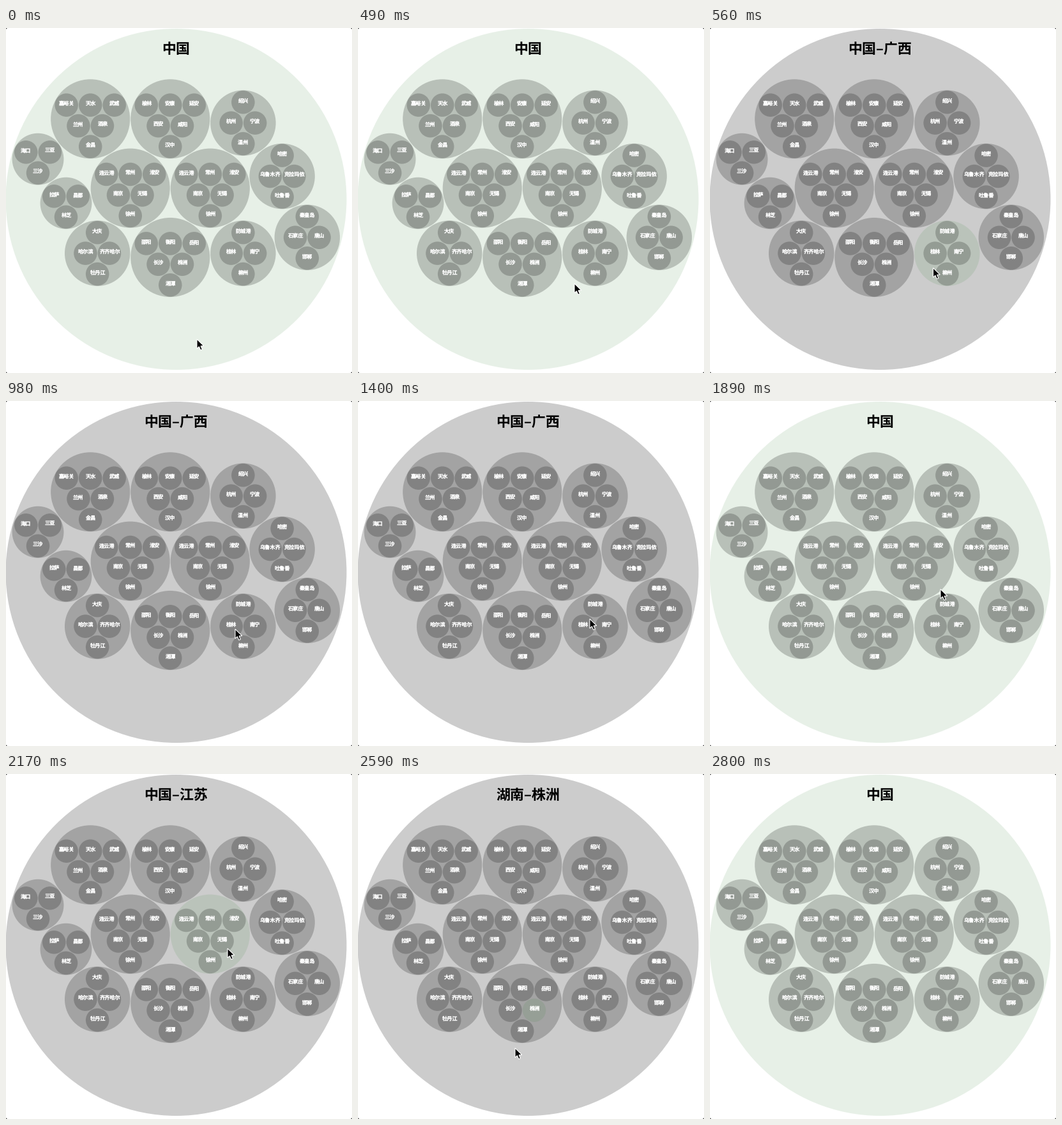
A matplotlib script that plays this animation: 542 by 540 pixels, repeating every 3.01 s.

```python
import numpy as np
import matplotlib.pyplot as plt
from matplotlib.animation import FuncAnimation
from matplotlib.patches import Circle, Polygon

W, H, DPI = 542, 540, 100
STEP, COUNT = 70, 43
FONT = "Noto Sans CJK JP"
LABEL, TITLE = 8.2, 22
PLAIN = (0, 0, 0, 0.2)
HOVER = (0.25, 0.54, 0.25, 0.12)
COUNTRY = "中国"

GAP = 0.5       # padding around every packed circle
CELL = 18.75    # leaf radius with padding
ROWS = {3: (2, 1), 4: (1, 2, 1), 6: (3, 2, 1)}

# Name, cities, and the two earlier circles each province rests against
PROVINCES = [
    ("甘肃", "嘉峪关 天水 武威 兰州 酒泉 金昌", None),
    ("陕西", "榆林 安康 延安 西安 咸阳 汉中", None),
    ("江苏", "连云港 常州 淮安 南京 无锡 徐州", (0, 1)),
    ("江苏", "连云港 常州 淮安 南京 无锡 徐州", (2, 1)),
    ("湖南", "邵阳 衡阳 岳阳 长沙 株洲 湘潭", (2, 3)),
    ("浙江", "绍兴 杭州 宁波 温州", (3, 1)),
    ("广西", "防城港 桂林 南宁 柳州", (4, 3)),
    ("黑龙江", "大庆 哈尔滨 齐齐哈尔 牡丹江", (2, 4)),
    ("西藏", "拉萨 昌都 林芝", (2, 7)),
    ("海南", "海口 三亚 三沙", (0, 8)),
    ("新疆", "哈密 乌鲁木齐 克拉玛依 吐鲁番", (3, 5)),
    ("河北", "秦皇岛 石家庄 唐山 邯郸", (6, 10)),
]

# Key points of the pointer: step, x, y
KEYS = np.array([
    (0, 299, 487), (5, 299, 487), (7, 339, 400), (8, 349.5, 375.5),
    (9.5, 359, 357), (17, 359, 357), (18, 359, 355), (19, 359, 355),
    (20, 363, 341), (21.5, 364, 309), (24, 364, 309), (25, 364, 306),
    (27, 361, 294.5), (30, 352, 282), (31, 347, 273), (32, 343, 268),
    (32.5, 343, 268), (36.5, 272, 380), (37, 246, 429), (40, 190, 546),
])
LAG = 0.5       # highlight trails the pointer by half a step
CLICK = 3
ARROW = np.array([(0, 0), (0, 14.8), (3.4, 11.7), (5.8, 17.2), (8.4, 16.1),
                  (6.1, 10.8), (10.8, 10.6)])

plt.rcParams["text.hinting"] = "none"
fig = plt.figure(figsize=(W / DPI, H / DPI), dpi=DPI, facecolor="white")
ax = fig.add_axes([0, 0, 1, 1])
ax.set_xlim(0, W)
ax.set_ylim(H, 0)
ax.axis("off")


def add_circle(center, r, z):
    return ax.add_patch(Circle(center, r, fc=PLAIN, lw=0, zorder=z))


def add_text(x, y, text, px, color):
    return ax.text(x, y, text, family=FONT, weight="bold", color=color,
                   size=px * 72 / DPI, ha="center", va="baseline", zorder=4)


def leaf_offsets(n):
    """Leaf centres in staggered rows, balanced around the origin."""
    spots = np.array([((2 * j - m + 1) * CELL, i * CELL * np.sqrt(3))
                      for i, m in enumerate(ROWS[n]) for j in range(m)])
    return spots - spots.mean(axis=0)


def nestle(a, b, r):
    """Centre of a circle of radius r touching a and b, right of a to b."""
    (p, ra), (q, rb) = a, b
    d = np.hypot(*(q - p))
    u = (q - p) / d
    along = ((ra + r) ** 2 - (rb + r) ** 2 + d ** 2) / (2 * d)
    across = np.sqrt((ra + r) ** 2 - along ** 2)
    return p + along * u + across * np.array([-u[1], u[0]])


def build():
    """Draw all nodes; return hit targets as (patch, title, label half width)."""
    root = add_circle((266.5, 268), 267, 1)
    groups, leaves, packed = [], [], []
    for name, cities, rests_on in PROVINCES:
        cities = cities.split()
        spots = leaf_offsets(len(cities))
        r = np.hypot(*spots.T).max() + CELL + GAP
        if rests_on:
            center = nestle(*(packed[i] for i in rests_on), r)
        else:
            center = np.array([132.2 + 2 * r * len(packed), 142.3])
        packed.append((center, r))
        groups.append((add_circle(center, r - GAP, 2), f"{COUNTRY}–{name}", 0))
        for city, (x, y) in zip(cities, center + spots):
            leaf = add_circle((x, y), CELL - GAP, 3)
            add_text(x, y + 0.6, city, LABEL, "white")
            leaves.append((leaf, f"{name}–{city}", len(city) * LABEL / 2))
    return root, groups, leaves


def inside(circle, p):
    return np.hypot(*(p - circle.center)) < circle.radius


def pointer_at(k):
    return np.array([np.interp(k, KEYS[:, 0], KEYS[:, i]) for i in (1, 2)])


def hover(p):
    """Title and highlighted circle; a label hides its leaf from the pointer."""
    group = next((g for g in groups if inside(g[0], p)), None)
    if group is None:
        return COUNTRY, root
    for leaf, text, half in leaves:
        if inside(leaf, p):
            dx, dy = abs(p - leaf.center)
            on_label = dx < half + 0.3 and dy < 6
            return (group[1], None) if on_label else (text, leaf)
    return group[1], group[0]


root, groups, leaves = build()
nodes = [root] + [node[0] for node in groups + leaves]

# Rounded window corners
for x, sx in ((0, 1), (W, -1)):
    for y, sy in ((0, 1), (H, -1)):
        ax.add_patch(Polygon([(x, y), (x + 2 * sx, y), (x, y + 2 * sy)],
                             fc="#444444", lw=0))

title = add_text(266, 39.7, "", TITLE, "black")
ring = ax.add_patch(Circle(pointer_at(CLICK), 22.5, fill=False, ec="#777777",
                           lw=0.8, zorder=5))
pointer = ax.add_patch(Polygon(ARROW, fc="black", ec="white", lw=0.8, zorder=6))


def draw(k):
    text, active = hover(pointer_at(k - LAG))
    title.set_text(text)
    for node in nodes:
        node.set_facecolor(HOVER if node is active else PLAIN)
    pointer.set_xy(ARROW + pointer_at(k))
    ring.set_visible(k == CLICK)
    return [title, pointer, ring, *nodes]


anim = FuncAnimation(fig, draw, frames=COUNT, interval=STEP, repeat=True,
                     repeat_delay=0, blit=False)
plt.show()
```
